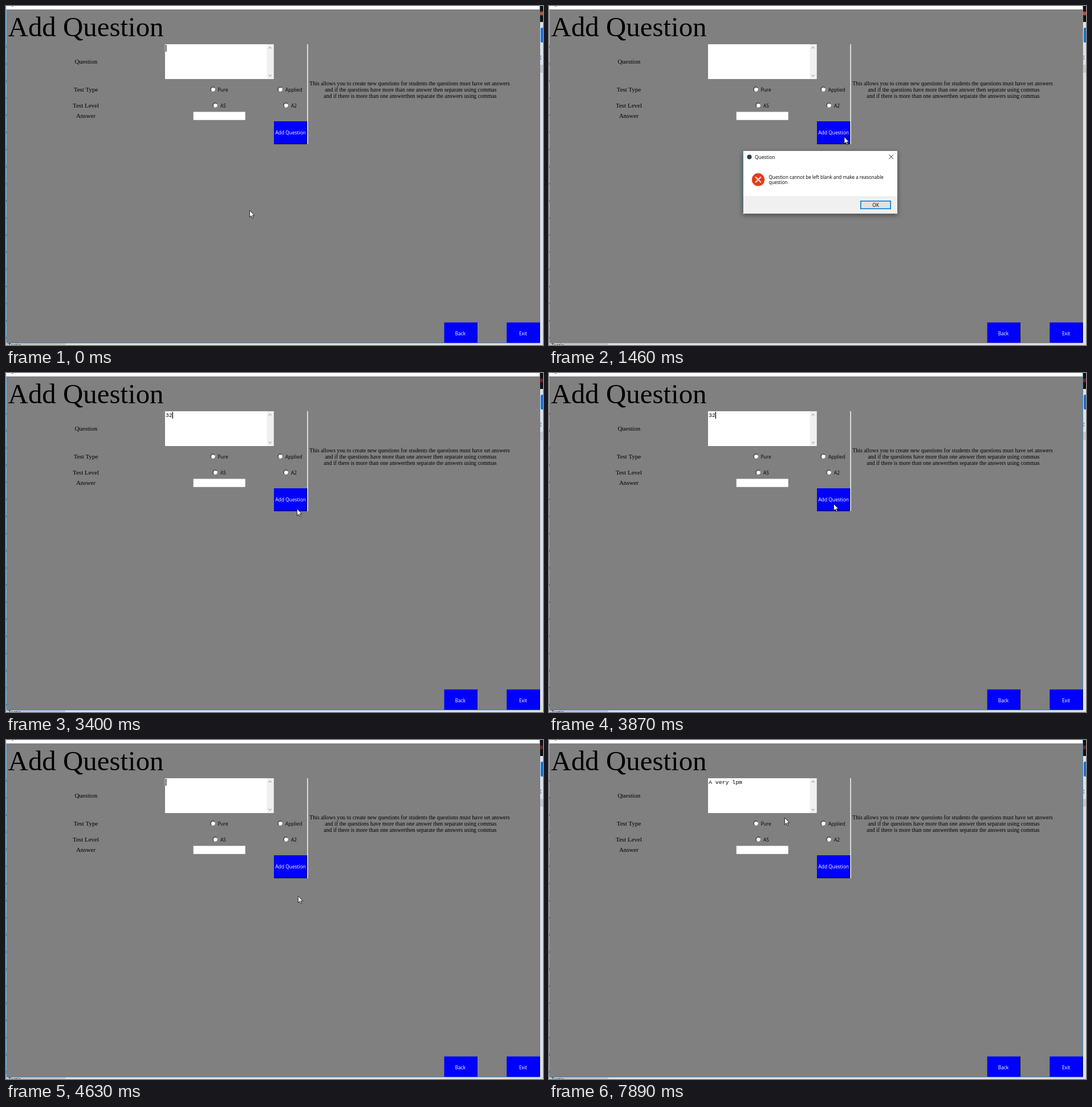
Recreate the animation shown at these times as an HTML page. Size 942 px wide and 594 px high, loop 8000 ms.

```html
<!DOCTYPE html>
<html lang="en">
<head>
<meta charset="utf-8">
<title>Add Question</title>
<style>
  html, body { margin: 0; width: 100%; height: 100%; overflow: hidden; background: #808080; }
  svg { display: block; }
  text { white-space: pre; }
  .serif { font-family: "Liberation Serif", "Times New Roman", serif; }
  .ui { font: 8.4px "Open Sans", "Noto Sans", sans-serif; }
  .mid { text-anchor: middle; }
  .label { font-size: 11px; }
  .help { font-size: 9.9px; }
  .mono { font: 9.83px "Liberation Mono", "Courier New", monospace; }
</style>
</head>
<body>
<svg width="942" height="594" viewBox="0 0 942 594">
  <defs>
    <g id="button">
      <path fill="#00f" d="M0 0h58v40H0z"/>
      <path fill="none" stroke="#000030" d="M0 39.7H57.7V0"/>
    </g>
    <g id="radio">
      <circle r="3.8" fill="#fff"/>
      <path d="M-2.7 2.700A3.800 3.800 0 0 1 2.700-2.700" fill="none" stroke="#222" stroke-width="1.200"/>
    </g>
    <clipPath id="client"><path d="M1 6h936v584H1z"/></clipPath>
    <filter id="shadow" x="-10%" y="-20%" width="120%" height="150%">
      <feDropShadow dx="0" dy="3" stdDeviation="4" flood-opacity=".45"/>
    </filter>
  </defs>

  <!-- desktop visible around the window -->
  <path fill="#e0e2e4" d="M0 0h942v594H0z"/>
  <path fill="#c8c8c8" d="M0 591h104v3H0zM937 103h5v14h-5z"/>
  <path fill="#14100f" d="M937 0h5v28h-5z"/>
  <circle id="glow" cx="940" cy="13" r="3.5"/>
  <path fill="#1a6fd0" d="M938 40q0-2 2-2h2v26h-2q-2 0-2-2z"/>
  <text class="ui" x="935" y="92" fill="#456a9a">g</text>
  <text class="ui" x="4" y="598" fill="#222">Testin</text>
  <path stroke="#2a5b8c" stroke-dasharray="3 27" d="M.5 70V585"/>

  <!-- window -->
  <path fill="#fff" d="M1 0h936v6H1z"/>
  <path fill="#777" d="M10 0h3v1h-3z"/>
  <path fill="#808080" d="M1 6h935v584H1z"/>
  <path id="frame" fill="none" d="M1 6V590.5H936.5V0"/>

  <text class="serif" x="3.6" y="52.5" font-size="48.9">Add Question</text>
  <g class="serif label mid">
    <text x="140.3" y="100.5">Question</text>
    <text x="140" y="150">Test Type</text>
    <text x="140" y="177.5">Test Level</text>
    <text x="140" y="196">Answer</text>
  </g>
  <g class="serif help mid">
    <text x="708" y="139">This allows you to create new questions for students the questions must have set answers</text>
    <text x="710" y="150">and if the questions have more than one answer then separate using commas</text>
    <text x="709" y="161">and if there is more than one answerthen separate the answers using commas</text>
  </g>

  <path fill="#fff" d="M279 67h190.500v61H279zM328.700 185.500h91v14.300h-91zM528.400 67h1.400v175h-1.400z"/>
  <path fill="#f0f0f0" d="M457.500 67h12v60.500h-12z"/>
  <path fill="none" stroke="#b4b4b4" stroke-width="1.300" d="M460.500 74.500l2.700-2.800 2.700 2.800M460.500 120.500l2.700 2.800 2.700-2.800"/>

  <use href="#radio" x="363" y="146"/>
  <use href="#radio" x="481" y="146"/>
  <use href="#radio" x="367" y="174"/>
  <use href="#radio" x="491" y="174"/>
  <g class="ui">
    <text x="371.500" y="149.500">Pure</text>
    <text x="490" y="149.500">Applied</text>
    <text x="376" y="177.500">AS</text>
    <text x="500" y="177.500">A2</text>
  </g>

  <g clip-path="url(#client)">
    <use href="#button" x="470" y="202"/>
    <use href="#button" x="768.700" y="554.600"/>
    <use href="#button" x="878.300" y="554.600"/>
  </g>
  <g class="ui mid" fill="#fff">
    <text x="499.200" y="225">Add Question</text>
    <text x="797" y="577">Back</text>
    <text x="907" y="577">Exit</text>
  </g>

  <text id="typed" class="mono" x="280" y="77"></text>
  <path id="caret" d="M0 68h1.200v12H0z"/>

  <g id="dialog" class="ui">
    <path filter="url(#shadow)" fill="#fff" d="M340 254h271v109.500H340z"/>
    <path fill="#f0f0f0" d="M340 333h271v30.500H340z"/>
    <path fill="none" stroke="#3a8fc0" d="M340.500 254V363"/>
    <circle cx="351.500" cy="264.500" r="4" fill="#2b3a48"/>
    <text x="361" y="268">Question</text>
    <path stroke="#222" d="M596.500 260.500l7.500 7.500M604 260.500l-7.500 7.500"/>
    <circle cx="367" cy="304.300" r="11.200" fill="#e83a17"/>
    <path stroke="#fff" stroke-width="1.800" d="M362.200 299.500l9.600 9.600M371.800 299.500l-9.600 9.600"/>
    <g font-size="8.100">
      <text x="385.500" y="303">Question cannot be left blank and make a reasonable</text>
      <text x="385.500" y="312">question</text>
    </g>
    <path fill="#e1e1e1" stroke="#0078d7" stroke-width="1.600" d="M546.800 341.800h52.400v13.400h-52.400z"/>
    <text class="mid" x="573" y="351.700">OK</text>
  </g>

  <path id="mouse" fill="#fff" stroke="#000" stroke-width=".8" d="M.4 1.200V13.200L3.100 10.600 5 14.900 6.800 14.100 5 10H8.800z"/>
</svg>
<script>
const LOOP = 8000;
const $ = id => document.getElementById(id);

// Each entry is [start time, text]; the text holds until the next entry.
const typing = [[0, ''], [2690, '32'], [4630, ''], [5650, 'A'], [5890, 'A '], [6460, 'A v'],
  [6600, 'A ve'], [6740, 'A ver'], [6810, 'A very'], [6960, 'A very '],
  [7500, 'A very l'], [7650, 'A very lp'], [7740, 'A very lpm']];
// The caret turns on and off alternately at these times.
const blinks = [0, 70, 370, 990, 2070, 2690, 3000, 3600, 3870, 3940,
  4630, 5250, 5560, 6130, 6460, 7040, 7340, 7890];
const dialogs = [[1220, 2070], [3940, 4630]];

// Pointer moves: start, end, number of steps, target position.
const moves = [[290, 520, 4, 459, 271], [700, 990, 5, 529, 226], [1150, 1150, 1, 521, 220],
  [1300, 1780, 7, 513, 239], [3400, 3700, 5, 499, 228],
  [4250, 4330, 2, 512, 272], [5040, 5100, 2, 413, 135]];

function pointerAt(t) {
  let x = 427, y = 357;
  for (const [start, end, steps, tx, ty] of moves) {
    if (t < start) break;
    const gap = (end - start) / Math.max(steps - 1, 1);
    const done = gap ? Math.min(1, (Math.floor((t - start) / gap + 1e-6) + 1) / steps) : 1;
    x += (tx - x) * done;
    y += (ty - y) * done;
  }
  return [x, y];
}

function draw(now) {
  const t = now % LOOP;
  const text = typing.filter(([start]) => start <= t).pop()[1];
  const open = dialogs.some(([a, b]) => t >= a && t < b);
  const caretOn = blinks.filter(b => b <= t).length % 2;

  $('typed').textContent = text;
  $('caret').setAttribute('transform', `translate(${280 + 5.9 * text.length})`);
  $('caret').style.display = caretOn ? '' : 'none';
  $('dialog').style.display = open ? '' : 'none';
  $('frame').setAttribute('stroke', open ? '#909090' : '#3f86c4');
  $('glow').setAttribute('fill', open ? '#d8402a' : t < 1220 ? '#b5552a' : '#701a1c');
  $('mouse').setAttribute('transform', `translate(${pointerAt(t)})`);
}

const begin = performance.now();
function tick() {
  draw(performance.now() - begin);
  requestAnimationFrame(tick);
}
tick();
</script>
</body>
</html>
```
